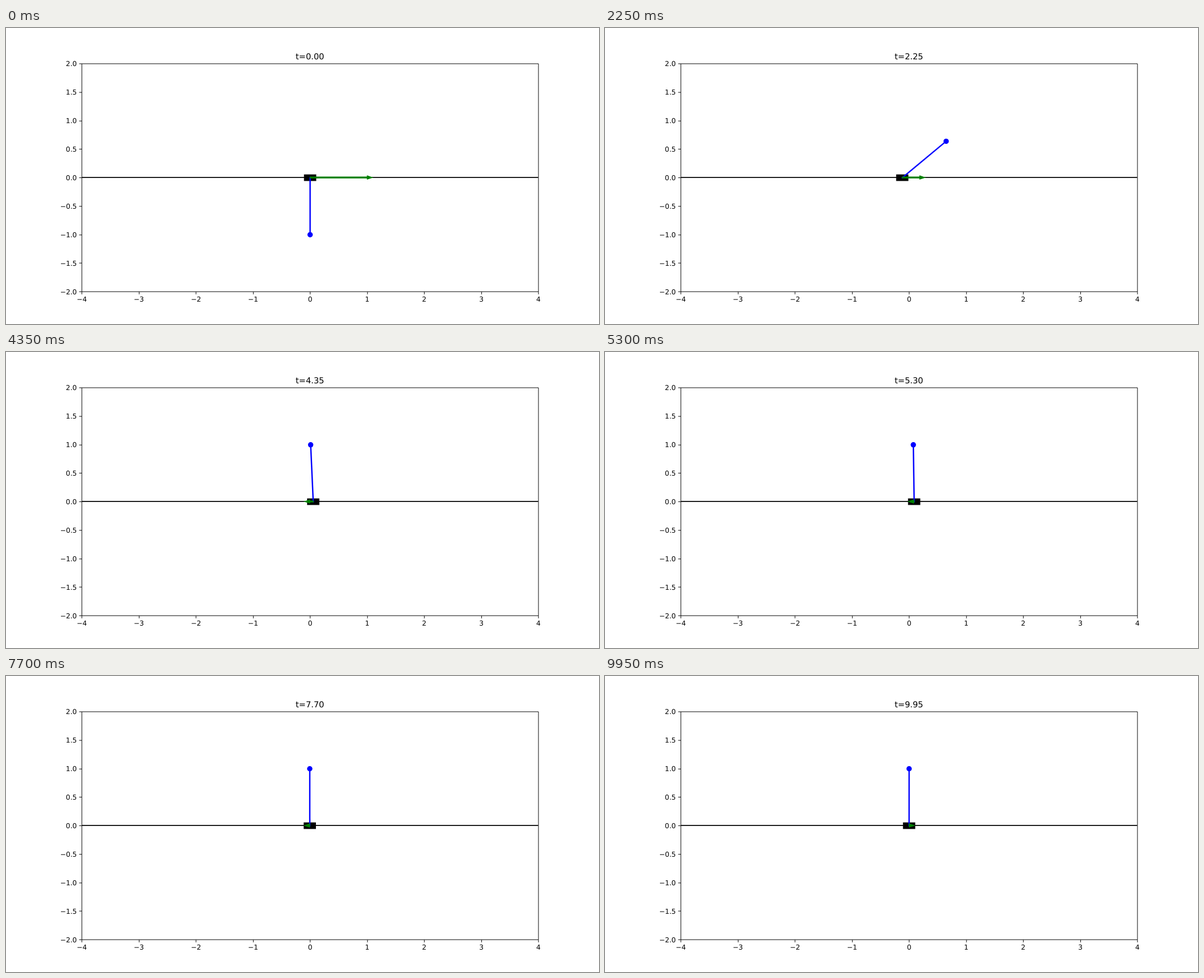
These frames come from a looping animation (1058x529 px, 10 s). An HTML page:

```html
<!DOCTYPE html>
<html lang="en">
<head>
<meta charset="utf-8">
<title>Cart and pendulum</title>
<style>
  html, body { margin: 0; width: 100%; height: 100%; overflow: hidden; background: #fff; }
  svg { display: block; width: 1058px; height: 529px; }
  text { font: 13.89px "DejaVu Sans", sans-serif; text-rendering: geometricPrecision; }
  #title { font-size: 16.67px; }
</style>
</head>
<body>
<svg viewBox="0 0 1200 600">
  <path id="axes" stroke="#000" stroke-width="1.11" fill="none"/>
  <g id="labels"></g>
  <text id="title" x="615" y="63.8" text-anchor="middle">t=0.00</text>
  <path d="M153.5 303H1077" stroke="#000" stroke-width="2.08"/>
  <rect id="cart" y="296.8" width="24.8" height="13.3"/>
  <line id="rod" y1="303.5" stroke="#00f" stroke-width="2.78" stroke-linecap="square"/>
  <circle id="bob" r="5.4" fill="#00f"/>
  <path id="arrow" fill="#008000" stroke="#008000" stroke-width="1.39" stroke-miterlimit="10"/>
</svg>
<script>
const CX = 615.4, CY = 303.5, UNIT = 115.5;
const STEP = 50, LOOP = 10000;
const SWING_END = 2.6;
const el = id => document.getElementById(id);
const px = x => CX + x * UNIT;
const py = y => CY - y * UNIT;

// Swing-up key poses: time, value, speed
const cartSwing = [[0, 0, 0], [0.45, 1.25, 5.5], [1.25, 2.004, -3.7], [SWING_END, -0.456, -0.91]];
const poleSwing = [[0, 0, 0], [0.45, -1.13, -3.5], [0.95, -2, 0], [1.25, -1.855, 0.9],
                   [1.75, -0.2, 6], [SWING_END, 2.91, 0.05]];

function hermite(keys, t) {
  const i = keys.findIndex(k => k[0] > t);
  const [t0, p0, v0] = keys[i - 1], [t1, p1, v1] = keys[i];
  const h = t1 - t0, u = (t - t0) / h, w = 1 - u;
  return w * w * ((1 + 2 * u) * p0 + u * h * v0) + u * u * ((1 + 2 * w) * p1 - w * h * v1);
}

// Damped oscillation that brings everything to rest
function settle(t, size, delay) {
  const s = t - 3.25;
  return size * Math.exp(-0.85 * s) * Math.sin(1.65 * (s - delay));
}

const cartAt = t => t < SWING_END ? hermite(cartSwing, t) : settle(t, 0.524, 0.936);
const poleAt = t => t < SWING_END ? hermite(poleSwing, t) : Math.PI + settle(t, 0.142, 0.525);

function forceAt(t) {
  if (t < 0.45) return 1;
  if (t < 1.75) return -1;
  if (t < 2.2) return 1;
  return -settle(t, 0.159, 0.32);
}

function drawAxes() {
  const number = (v, digits) => v.toFixed(digits).replace("-", "\u2212");
  let d = "M153.5 72.5H1077.5V534.5H153.5Z", text = "";
  for (let i = -4; i <= 4; i++) {
    const x = 615 + i * UNIT, y = 303 - i / 2 * UNIT;
    d += `M${Math.round(x) + 0.5} 534.5v5.4M153.5 ${Math.round(y) + 0.5}h-5.4`;
    text += `<text x="${x + 0.4}" y="555" text-anchor="middle">${number(i, 0)}</text>`
          + `<text x="143.3" y="${y + 5.6}" text-anchor="end">${number(i / 2, 1)}</text>`;
  }
  el("axes").setAttribute("d", d);
  el("labels").innerHTML = text;
}

function arrowPath(x, f) {
  const y = 303, w = 1.155, h = 3.465;
  const neck = x + f * UNIT, tip = neck + (f < 0 ? -10.4 : 10.4);
  return `M${x} ${y - w}H${neck}V${y - h}L${tip} ${y}L${neck} ${y + h}V${y + w}H${x}Z`;
}

function set(id, attrs) {
  for (const k in attrs) el(id).setAttribute(k, attrs[k]);
}

function draw(t) {
  const pos = cartAt(t), angle = poleAt(t);
  const x = px(pos), bx = px(pos + Math.sin(angle)), by = py(-Math.cos(angle));
  set("cart", { x: x - 12.4 });
  set("rod", { x1: x, x2: bx, y2: by });
  set("bob", { cx: bx, cy: by });
  set("arrow", { d: arrowPath(x, forceAt(t)) });
  el("title").textContent = "t=" + t.toFixed(2);
}

const start = performance.now();
function tick() {
  const ms = Math.max(0, performance.now() - start) % LOOP;
  draw(Math.floor(ms / STEP) * STEP / 1000);
  requestAnimationFrame(tick);
}

drawAxes();
draw(0);
requestAnimationFrame(tick);
</script>
</body>
</html>
```
